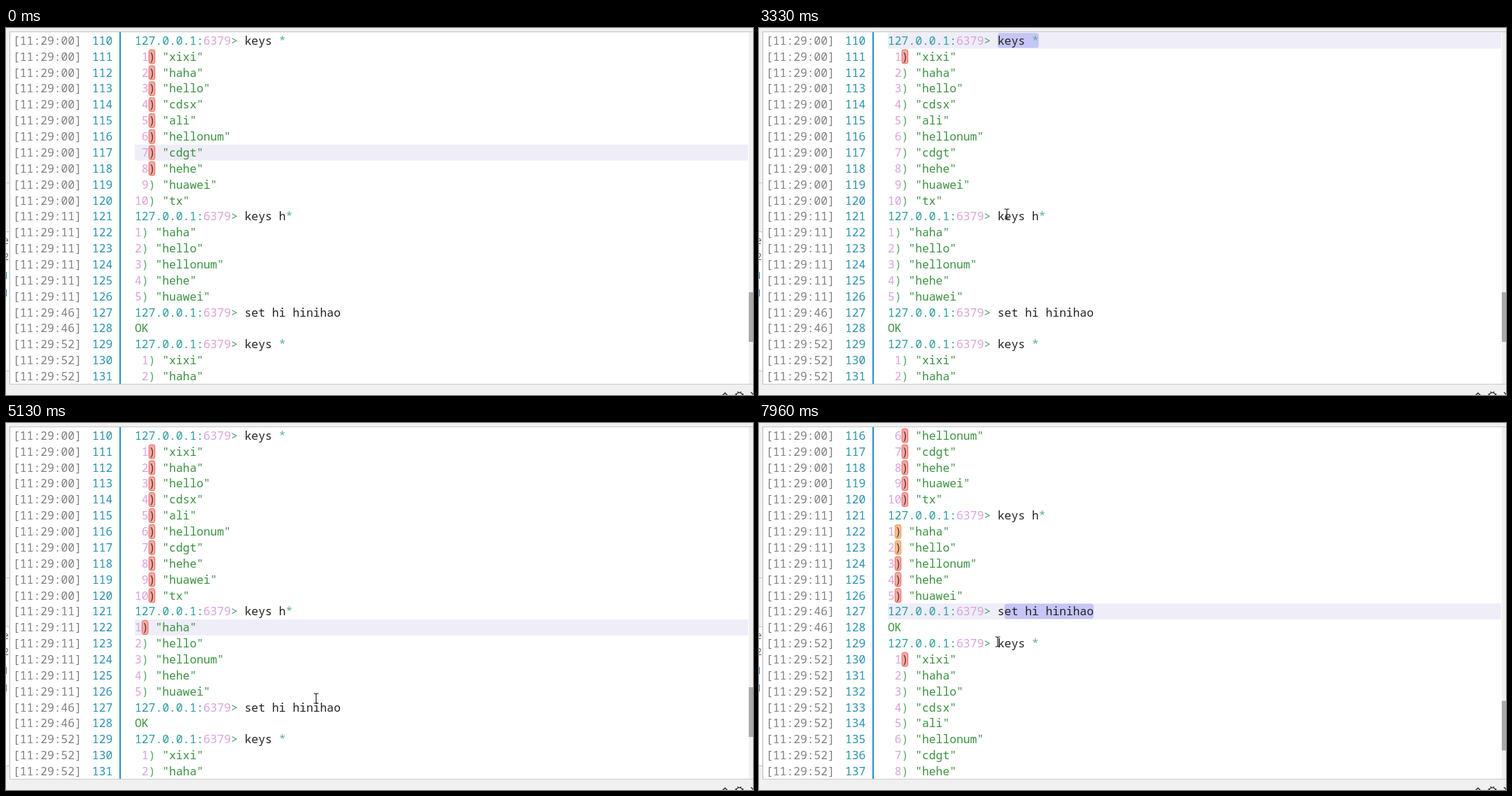
Animation of 1067 by 525 pixels, one loop 8000 ms. Source, as an HTML page with a canvas:

```html
<!DOCTYPE html>
<html lang="en">
<head>
<meta charset="utf-8">
<title>Terminal session</title>
<style>
html, body { margin: 0; width: 100%; height: 100%; overflow: hidden; background: #fff; }
canvas { display: block; }
</style>
</head>
<body>
<canvas id="stage" width="1067" height="525"></canvas>
<script>
const ctx = document.getElementById('stage').getContext('2d');
const LOOP = 8000, FIRST = 110, ROWS = 22;
const LEFT = 184, CHAR = 9.8, TOP = 6.6, ROW = 22.87;
const MONO = '16.33px "Noto Sans Mono", monospace';
const PLUM = '#dca0dd', TEAL = '#2a9a9f', GREEN = '#3b9140', INK = '#222';

// Terminal contents
const keys = ['xixi', 'haha', 'hello', 'cdsx', 'ali', 'hellonum', 'cdgt', 'hehe', 'huawei', 'tx'];
const lines = [];
const command = (time, text) => lines.push({ time, text });
const list = (time, items, pad) => items.forEach((key, i) =>
  lines.push({ time, key, index: String(i + 1).padStart(pad) }));
command('00', 'keys *');
list('00', keys, 2);
command('11', 'keys h*');
list('11', keys.filter(k => k[0] === 'h'), 1);
command('46', 'set hi hinihao');
lines.push({ time: '46', reply: 'OK' });
command('52', 'keys *');
list('52', keys, 2);

// Pointer path: time, x, y
const path = [
  [250, 912, 472], [530, 532, 165], [720, 532, 164], [810, 532, 165], [1200, 531, 162],
  [1940, 346, 10], [2070, 344, 9], [2270, 342, 11], [2730, 401, 16], [2870, 401, 17],
  [3330, 354, 266], [3590, 337, 268], [3690, 335, 268], [4340, 413, 269], [4530, 420, 271],
  [4730, 507, 298], [4870, 507, 298], [5130, 443, 394], [5870, 443, 394], [6600, 349, 265],
  [6810, 348, 262], [7200, 495, 262], [7350, 495, 262], [7960, 341, 313]
];
const presses = [[2270, 2870], [3690, 4400], [4800, 4930], [6810, 7350]];
const activeLines = [[0, 117], [2340, 110], [3690, 121], [4800, 122], [6810, 127]];
const scrolls = [[0, 0], [5460, 3], [5870, 6]];
// Drag selections: start time, end time, drag end, line, first and last column
const selections = [
  [2270, 3690, 2730, 110, 16, 22],
  [3690, 4800, 4340, 121, 15, 23],
  [6810, LOOP, 7200, 127, 17, 30]
];

const latest = (steps, t) => steps.filter(s => s[0] <= t).pop()[1];

function pointerAt(t) {
  if (t < path[0][0]) return null;
  const next = path.findIndex(p => p[0] > t);
  if (next < 0) return path[path.length - 1].slice(1);
  const [t0, x0, y0] = path[next - 1], [t1, x1, y1] = path[next];
  const f = (t - t0) / (t1 - t0);
  return [x0 + (x1 - x0) * f, y0 + (y1 - y0) * f];
}

function bracketAt(n, t) {
  const within = (a, b) => n >= a && n <= b;
  if (t < 2870) return within(111, 118) && 'red';
  if (t < 4530) return n === 111 && 'red';
  if (within(111, 120)) return 'red';
  if (t < 5460) return n === 122 && 'red';
  if (within(122, 123)) return 'orange';
  return t >= 7350 && (within(124, 126) || n === 130) && 'red';
}

function rect(x, y, w, h, color) {
  ctx.fillStyle = color;
  ctx.fillRect(x, y, w, h);
}

function roundRect(x, y, w, h, r, fill, stroke) {
  ctx.beginPath();
  ctx.roundRect(x, y, w, h, r);
  ctx.fillStyle = fill;
  ctx.fill();
  if (!stroke) return;
  ctx.strokeStyle = stroke;
  ctx.lineWidth = 1;
  ctx.stroke();
}

function text(str, x, y, color) {
  ctx.fillStyle = color;
  ctx.fillText(str, x, y);
}

// Draws coloured pieces one after another on the character grid
function pieces(y, parts) {
  let col = 0;
  for (const [str, color] of parts) {
    text(str, LEFT + col * CHAR, y, color);
    col += str.length;
  }
}

function drawLine(n, y, t) {
  const line = lines[n - FIRST], base = y + 17.2;
  text(`[11:29:${line.time}]`, 10, base, '#808080');
  text(n, 123, base, '#2b91af');
  if (line.text) {
    const star = line.text.endsWith('*');
    pieces(base, [['127.0.0.1:', TEAL], ['6379', PLUM], ['> ', '#4b9a63'],
      [star ? line.text.slice(0, -1) : line.text, INK], [star ? '*' : '', '#58b08c']]);
  } else if (line.reply) {
    pieces(base, [[line.reply, GREEN]]);
  } else {
    const mark = bracketAt(n, t);
    if (mark) {
      const x = LEFT + line.index.length * CHAR;
      roundRect(x + .5, y + 1.5, 8.6, 20, 3, ...(mark === 'red' ? ['#f8aaa5', '#e9655f'] : ['#f8bd91', '#e99b58']));
    }
    pieces(base, [[line.index, PLUM], [')', mark ? '#5b3a30' : '#4fae62'], [` "${line.key}"`, GREEN]]);
  }
}

function drawFrame(scroll) {
  rect(0, 0, 1067, 5, '#f0f0f0');
  rect(0, 5, 1067, 1, '#c4c4c4');
  rect(0, 510, 1067, 15, '#f0f0f0');
  rect(5, 509, 1062, 1, '#c8c8c8');
  rect(0, 0, 5, 510, '#f0f0f0');
  rect(0, 291, 4, 199, '#fff');
  for (const y of [221, 291, 490]) rect(0, y, 5, 1, '#c4c4c4');
  rect(5, 5, 1, 505, '#bcbcbc');
  rect(162, 6, 2, 503, '#2590cf');
  rect(1061, 6, 6, 503, '#f0f0f0');
  rect(1061, 378 + scroll * 3.25, 6, 71, '#a9a9a9');

  ctx.font = '14px "Open Sans", sans-serif';
  [['e', 309, '#555'], ['2', 332, '#555'], ['1', 359, '#2b6fa8'], ['1', 384, '#2b6fa8']]
    .forEach(([s, y, color]) => text(s, -4, y, color));

  // Icons cut off by the lower edge
  ctx.strokeStyle = '#333';
  ctx.lineWidth = 1.5;
  ctx.beginPath();
  ctx.moveTo(1023, 526);
  ctx.lineTo(1027, 522);
  ctx.lineTo(1031, 526);
  ctx.moveTo(1064, 521);
  ctx.lineTo(1069, 526);
  ctx.moveTo(1052, 526);
  ctx.arc(1047.5, 526, 4.5, 0, Math.PI, true);
  for (const a of [-.4, -1.2, -1.95, -2.75]) {
    ctx.moveTo(1047.5 + 4.5 * Math.cos(a), 526 + 4.5 * Math.sin(a));
    ctx.lineTo(1047.5 + 6.5 * Math.cos(a), 526 + 6.5 * Math.sin(a));
  }
  ctx.stroke();
}

function drawPointer(x, y, pressed) {
  if (pressed) {
    ctx.beginPath();
    ctx.arc(x, y + .5, 13.5, 0, 7);
    ctx.fillStyle = 'rgba(246, 232, 45, .8)';
    ctx.fill();
  }
  ctx.strokeStyle = pressed ? '#5d581c' : '#222';
  ctx.lineWidth = 1.2;
  ctx.beginPath();
  for (const end of [-1, 1]) {
    ctx.moveTo(x - 3.5, y + end * 7);
    ctx.lineTo(x - 1, y + end * 7);
    ctx.lineTo(x, y + end * 6);
    ctx.lineTo(x + 1, y + end * 7);
    ctx.lineTo(x + 3.5, y + end * 7);
  }
  ctx.moveTo(x, y - 6);
  ctx.lineTo(x, y + 6);
  ctx.stroke();
}

function draw() {
  const t = performance.now() % LOOP;
  const scroll = latest(scrolls, t), pointer = pointerAt(t);
  const rowTop = n => TOP + (n - FIRST - scroll) * ROW;

  rect(0, 0, 1067, 525, '#fff');
  drawFrame(scroll);
  rect(LEFT, rowTop(latest(activeLines, t)), 876, ROW, '#eeedf8');

  for (const [start, end, dragEnd, n, from, last] of selections) {
    if (t < start || t >= end) continue;
    const [x] = pointerAt(Math.min(t, dragEnd));
    const to = Math.min(last, Math.round((x - LEFT) / CHAR));
    if (to > from) roundRect(LEFT + from * CHAR, rowTop(n) + .4, (to - from) * CHAR, 21.6, 4, '#c6c5f6');
  }

  ctx.font = MONO;
  for (let i = 0; i < ROWS; i++) drawLine(FIRST + scroll + i, TOP + i * ROW, t);
  if (pointer) drawPointer(...pointer, presses.some(([a, b]) => t >= a && t < b));
  requestAnimationFrame(draw);
}
draw();
</script>
</body>
</html>
```
